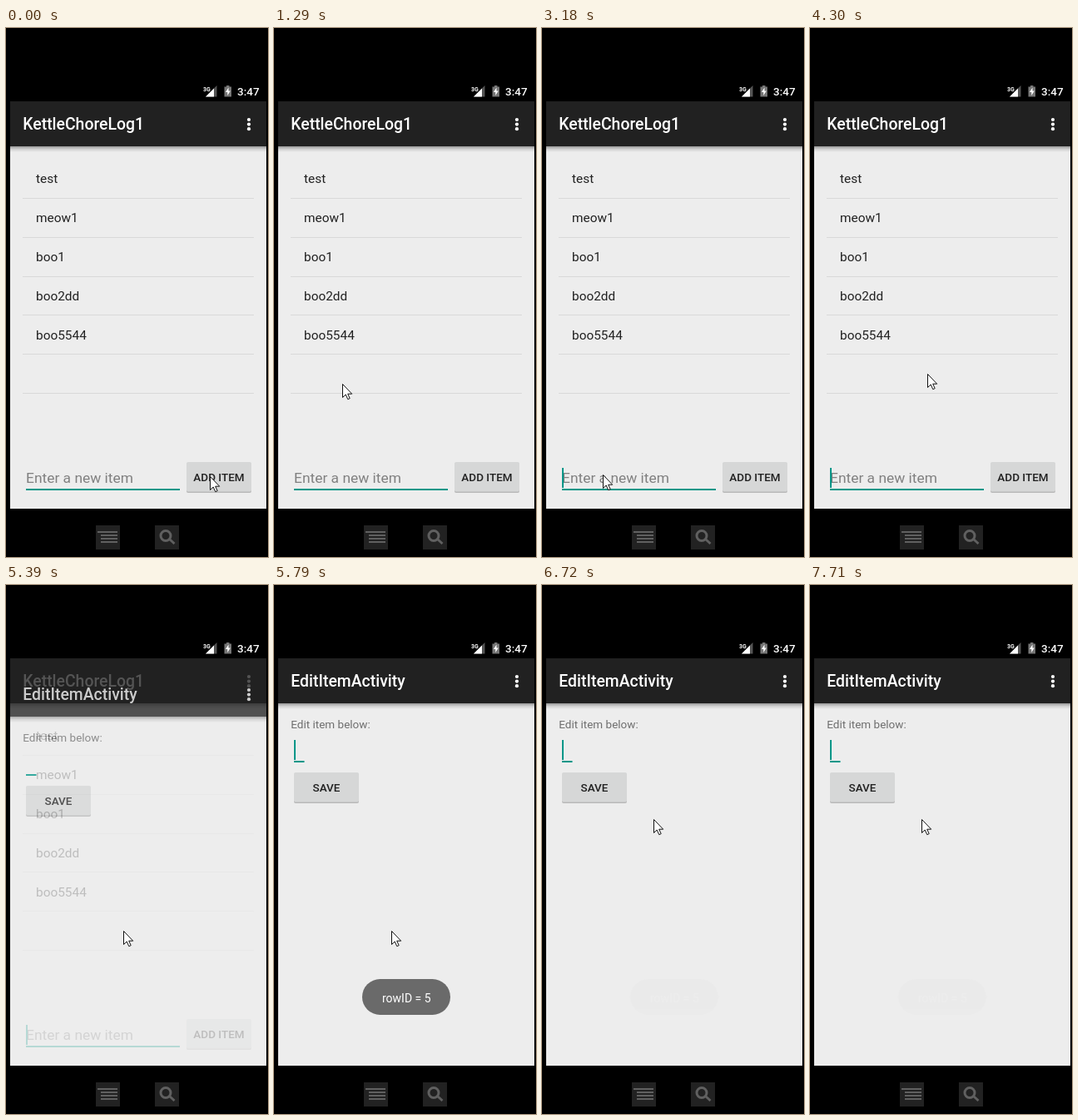
An HTML page that plays this animation: 315x635 px, repeating every 8000 ms.

```html
<!DOCTYPE html>
<html lang="en">
<head>
<meta charset="utf-8">
<title>Todo app</title>
<style>
  html, body { margin: 0; width: 100%; height: 100%; overflow: hidden; background: #000; }
  svg { display: block; width: 315px; height: 635px; font-family: Roboto, "Open Sans", sans-serif; }
  .title { font-size: 19.4px; font-weight: 500; fill: #fff; }
  .row { font-size: 15.4px; fill: #212121; }
  .hint { font-size: 17.4px; fill: #808080; }
  .label { font-size: 13.5px; fill: #6f6f6f; }
  .btn { font-size: 13.5px; font-weight: 500; fill: #212121; text-anchor: middle; }
  .toast { font-size: 14px; fill: #fff; text-anchor: middle; }
  .teal { fill: #009688; }
</style>
</head>
<body>
<svg id="stage" viewBox="0 0 315 635"></svg>
<script>
const LOOP = 8000;
const stage = document.getElementById('stage');

const rect = (x, y, w, h, attrs) =>
  `<rect x="${x}" y="${y}" width="${w}" height="${h}" ${attrs}/>`;
const text = (cls, x, y, str) => `<text class="${cls}" x="${x}" y="${y}">${str}</text>`;

const button = (x, y, label) =>
  rect(x, y + 1, 78, 36, 'rx="2" fill="#b9b9b9"') +
  rect(x, y, 78, 35.5, 'rx="2" fill="#d6d7d7"') +
  text('btn', x + 39, y + 23, label);

const page = (title, body) =>
  rect(5, 88, 308, 520, 'fill="#ededed"') + body +
  rect(5, 142, 308, 7, 'fill="url(#shade)"') +
  rect(5, 88, 308, 54, 'fill="#212121"') +
  text('title', 20.3, 122, title) +
  [110, 115.6, 121.2].map(y => `<circle cx="292" cy="${y}" r="2.1" fill="#fff"/>`).join('');

const rows = ['test', 'meow1', 'boo1', 'boo2dd', 'boo5544', ''].map((name, i) =>
  text('row', 36, 186.4 + i * 46.8, name) +
  rect(20, Math.round(204 + i * 46.8), 278, 1, 'fill="#d9d9d9"')).join('');

const listPage = page('KettleChoreLog1', rows +
  '<circle id="ripple" cx="148" cy="413" r="124.5" fill="#cfcfcf" clip-path="url(#rowClip)"/>' +
  text('hint', 24, 546, 'Enter a new item') +
  rect(24, 553, 185, 2, 'class="teal"') +
  rect(24, 528, 2, 24, 'id="listCaret" class="teal"') +
  button(217, 521, 'ADD ITEM'));

const editPage = page('EditItemActivity',
  text('label', 20.3, 172.4, 'Edit item below:') +
  rect(24, 211, 12.5, 2, 'class="teal"') +
  rect(24, 186, 2, 24, 'id="editCaret" class="teal"') +
  button(24, 225, 'SAVE'));

const statusBar =
  '<path d="M240 82.5L253.5 69V82.5Z" fill="#555"/>' +
  '<path d="M240 82.5L250 72.5V82.5Z" fill="#fff"/>' +
  '<text x="237" y="75.5" font-size="7" font-weight="700" fill="#fff">3G</text>' +
  '<path d="M262.5 70.5h2.5v-1.5h3.500v1.500h2.500v12h-8.500z" fill="#777"/>' +
  '<path d="M267.500 71.500l-3.500 5.500h2.300v4l3.500-5.500h-2.300z" fill="#fff"/>' +
  '<text x="278" y="81" font-size="13.500" font-weight="500" fill="#fff">3:47</text>';

const navKeys =
  rect(108, 597, 29, 29, 'fill="#222"') + rect(179, 597, 29, 29, 'fill="#222"') +
  rect(110, 604, 24, 2, 'fill="#606060"') +
  [608, 612, 616].map(y => rect(114, y, 20, 2, 'fill="#606060"')).join('') +
  '<g fill="none" stroke="#606060" stroke-width="3"><circle cx="192" cy="609.5" r="6"/>' +
  '<path d="M196.500 613.500L202.500 619"/></g>';

stage.innerHTML = `
  <defs>
    <linearGradient id="shade" x2="0" y2="1">
      <stop stop-opacity=".36"/><stop offset=".5" stop-opacity=".12"/><stop offset="1" stop-opacity="0"/>
    </linearGradient>
    <clipPath id="screenClip">${rect(5, 88, 308, 489, '')}</clipPath>
    <clipPath id="rowClip">${rect(20, 392, 278, 46, '')}</clipPath>
  </defs>
  ${statusBar}${navKeys}
  <g clip-path="url(#screenClip)">${listPage}<g id="edit">${editPage}</g></g>
  <g id="toast">${rect(106, 473, 106, 43, 'rx="21.5" fill="#6a6a6a"')}${text('toast', 159.3, 500.5, 'rowID = 5')}</g>
  <path id="cursor" d="M.5 .5V16.500L4.200 13L6.800 18.700L9.200 17.600L6.700 12.200H11.700Z"
    fill="#fff" stroke="#111" stroke-width="1"/>`;

// Each track holds [start time, ...values]; values stay until the next entry.
const tracks = {
  cursor: [[0, 245, 538], [900, 237, 532], [1020, 208, 510], [1170, 150, 470], [1290, 82, 427],
    [1440, 82, 420], [2150, 77, 517], [2310, 75, 521], [2460, 75, 529], [2620, 75, 532],
    [3180, 73, 536], [3880, 108, 478], [4010, 136, 426], [4160, 137, 423], [4300, 141, 415],
    [6210, 140, 385], [6330, 138, 320], [6450, 136, 281], [6600, 135, 281], [6720, 134, 281]],
  listCaret: [[0, 0], [460, 1], [900, 0], [1440, 1]],
  ripple: [[0, 0], [2150, 1], [2310, 0]],
  edit: [[0, 0, 0], [5390, .77, 16], [5510, 1, 4], [5660, 1, 0]],
  editCaret: [[0, 0], [5510, 1], [7160, 0], [7710, 1]],
  toast: [[0, 0], [5660, .45], [5790, 1], [6330, .9], [6450, .66], [6600, .22], [6720, .01]]
};

const valueAt = (name, t) => tracks[name].findLast(step => step[0] <= t).slice(1);
const parts = Object.fromEntries(Object.keys(tracks).map(id => [id, document.getElementById(id)]));

function draw(t) {
  for (const id of ['listCaret', 'ripple', 'editCaret', 'toast', 'edit']) {
    parts[id].setAttribute('opacity', valueAt(id, t)[0]);
  }
  parts.edit.setAttribute('transform', `translate(0 ${valueAt('edit', t)[1]})`);
  parts.cursor.setAttribute('transform', `translate(${valueAt('cursor', t)})`);
}

const start = performance.now();
function tick() {
  draw((performance.now() - start) % LOOP);
  requestAnimationFrame(tick);
}
tick();
</script>
</body>
</html>
```
